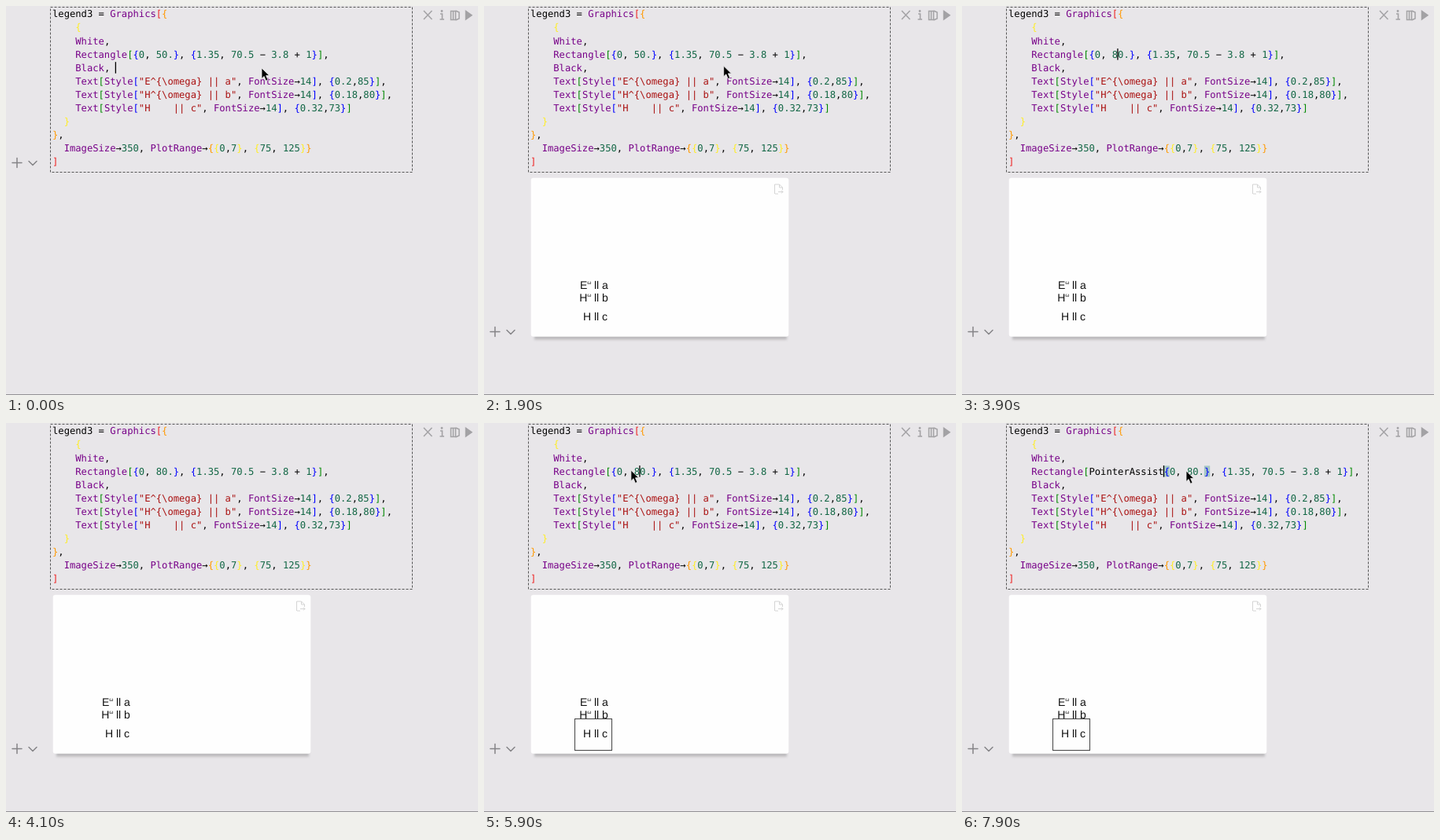
Write an HTML page that moves like this. It is 600 by 495 pixels and loops after 8 s.

```html
<!DOCTYPE html>
<html lang="en">
<head>
<meta charset="utf-8">
<title>Notebook cell</title>
<style>
html, body { margin: 0; width: 100%; height: 100%; overflow: hidden; background: #e8e6e9; }
svg { display: block; }
text { text-rendering: geometricPrecision; }
#code text { font: 12.16px "DejaVu Sans Mono", monospace; white-space: pre; }
#card text { font: 14px "Liberation Sans", Arial, sans-serif; fill: #111; }
#card .sup { font-size: 6.5px; }
.line { fill: none; stroke: #a3a2a5; stroke-width: 1.5; }
</style>
</head>
<body>
<svg width="600" height="495" viewBox="0 0 600 495">
  <path d="M0 494.5H600" stroke="#939195"/>
  <rect x="56.500" y="1.500" width="460" height="210" fill="none" stroke="#555" stroke-dasharray="3 2"/>

  <g class="line">
    <path d="M531 6l10.500 11M541.500 6l-10.500 11"/>
    <path d="M552 10h2.500v7M551.500 17h5.500" stroke-width="1.600"/>
    <circle cx="554" cy="6.500" r=".7"/>
    <path d="M565.500 6.500h6v11h-6zM571.500 6l4.500 2v8l-4.500 2M568.500 7v10" stroke-width="1.500"/>
    <path d="M584.500 6.500v10.500l7.500-5.200z" fill="#a3a2a5"/>
  </g>

  <g id="tools" class="line" stroke-linecap="round">
    <path d="M8 0h12M14-6v12M29-2l5 5 5-5" stroke="#858487"/>
  </g>

  <g id="card">
    <rect x="64" y="400" width="321" height="24.500" fill="#bbb9bc" style="filter:blur(1.5px)"/>
    <rect x="59.700" y="218.700" width="327.600" height="202" rx="3" fill="#fefefe"/>
    <path d="M369.500 239v-12h6l4 4v3M375.500 227v4h4M370 239h4M374 236.500h6m-2-2 2 2-2 2" fill="none" stroke="#d4d4d4"/>
    <rect id="box" x="115.500" y="376.500" width="47" height="40" fill="#fefefe" stroke="#444"/>
    <text x="122" y="360.300">E</text><text class="sup" x="131.300" y="354">ω</text><text x="140" y="360.300">ll a</text>
    <text x="121.300" y="376.300">H</text><text class="sup" x="131.300" y="370">ω</text><text x="140" y="376.300">ll b</text>
    <text x="126" y="399.500">H ll c</text>
  </g>

  <g id="marks" fill="#a3c5c4"></g>
  <g id="code"></g>
  <rect id="caret" width="1.300" height="14.500" fill="#000"/>
  <path id="mouse" d="M0 0v13.500l3.100-3 2.400 5.700 2.500-1.100-2.400-5.500h4.200z" fill="#000" stroke="#eee" stroke-width=".8"/>
</svg>
<script>
const NS = "http://www.w3.org/2000/svg";
const $ = id => document.getElementById(id);
const X0 = 59, CELL = 7.32, BASE = 14.4, ROW = 17.08, LOOP = 8000;
const depthColors = ["#e22", "#f90", "#fe2", "#080", "#00f"];

const source = arg => `legend3 = Graphics[{
    {
    White,
    Rectangle[${arg}, {1.35, 70.5 − 3.8 + 1}],
    Black, 
    Text[Style["E^{\\omega} || a", FontSize→14], {0.2,85}],
    Text[Style["H^{\\omega} || b", FontSize→14], {0.18,80}],
    Text[Style["H    || c", FontSize→14], {0.32,73}]
  }
},
  ImageSize→350, PlotRange→{{0,7}, {75, 125}}
]`;

function add(parent, tag, attrs, text = "") {
  const el = document.createElementNS(NS, tag);
  for (const k in attrs) el.setAttribute(k, attrs[k]);
  el.textContent = text;
  return parent.appendChild(el);
}

const colX = col => X0 + col * CELL;
const baseline = row => BASE + row * ROW;

function drawCode(arg) {
  $("code").replaceChildren();
  let depth = 0;
  source(arg).split("\n").forEach((line, row) => {
    const text = add($("code"), "text", { x: X0, y: baseline(row) });
    for (const token of line.match(/"[^"]*"|[A-Za-z]\w*|[\d.]+|[[\]{}]|\s+|./g)) {
      let fill = "#000";
      if (token[0] === '"') fill = "#a11";
      else if (/^[A-Z]/.test(token) && token !== "PointerAssist") fill = "#708";
      else if (/^\d/.test(token)) fill = "#164";
      else if (/[[{]/.test(token)) fill = depthColors[depth++];
      else if (/[\]}]/.test(token)) fill = depthColors[--depth];
      add(text, "tspan", { fill }, token);
    }
  });
}

// Each edit: start time, first argument, caret row and column, matched bracket columns.
const edits = [
  [-250, "{0, 50.}", 4, 11, []],
  [2600, "{0, 50.}", 3, 18, []],
  [3000, "{0, 50.}", 3, 19, []],
  [3200, "{0, 0.}", 3, 18, []],
  [3500, "{0, 80.}", 3, 19, []],
  [6800, "{0, 80.}", 3, 14, [13, 46]],
  [7400, "PointerAssist{0, 80.}", 3, 27, [27, 34]]
];

// Pointer moves: from time, to time, start point, end point; visible until hideAt.
const moves = [
  { start: 0, end: 1, hideAt: 800, from: [325, 79], to: [325, 79] },
  { start: 1700, end: 2500, hideAt: 3000, from: [325, 79], to: [196, 62] },
  { start: 5500, end: 6700, hideAt: 7400, from: [196, 62], to: [161, 55] },
  { start: 7500, end: 7900, hideAt: LOOP, from: [161, 55], to: [285, 61] }
];

const show = (id, on) => $(id).setAttribute("visibility", on ? "visible" : "hidden");
let current;

function applyEdit(edit) {
  const [, arg, row, col, matches] = current = edit;
  drawCode(arg);
  $("marks").replaceChildren();
  for (const c of matches)
    add($("marks"), "rect", { x: colX(c), y: baseline(row) - 11.2, width: CELL, height: 14 });
  $("caret").setAttribute("x", colX(col) - 0.8);
  $("caret").setAttribute("y", baseline(row) - 11.5);
}

function render(t) {
  const edit = edits.findLast(e => t >= e[0]);
  if (edit !== current) applyEdit(edit);
  show("caret", (t - edit[0]) % 1200 < 600);

  const evaluated = t >= 1000;
  $("card").style.display = evaluated ? "" : "none";
  $("box").style.display = t >= 4200 ? "" : "none";
  $("tools").setAttribute("transform", `translate(0 ${evaluated ? 414.5 : 199.5})`);

  const move = moves.find(m => t >= m.start && t < m.hideAt);
  show("mouse", move);
  if (move) {
    const p = Math.min(1, (t - move.start) / (move.end - move.start));
    const ease = p * p * (3 - 2 * p);
    const [x, y] = move.from.map((v, i) => v + (move.to[i] - v) * ease);
    $("mouse").setAttribute("transform", `translate(${x} ${y})`);
  }
}

const begin = performance.now();
function frame() {
  render((performance.now() - begin) % LOOP);
  requestAnimationFrame(frame);
}
frame();
</script>
</body>
</html>
```
